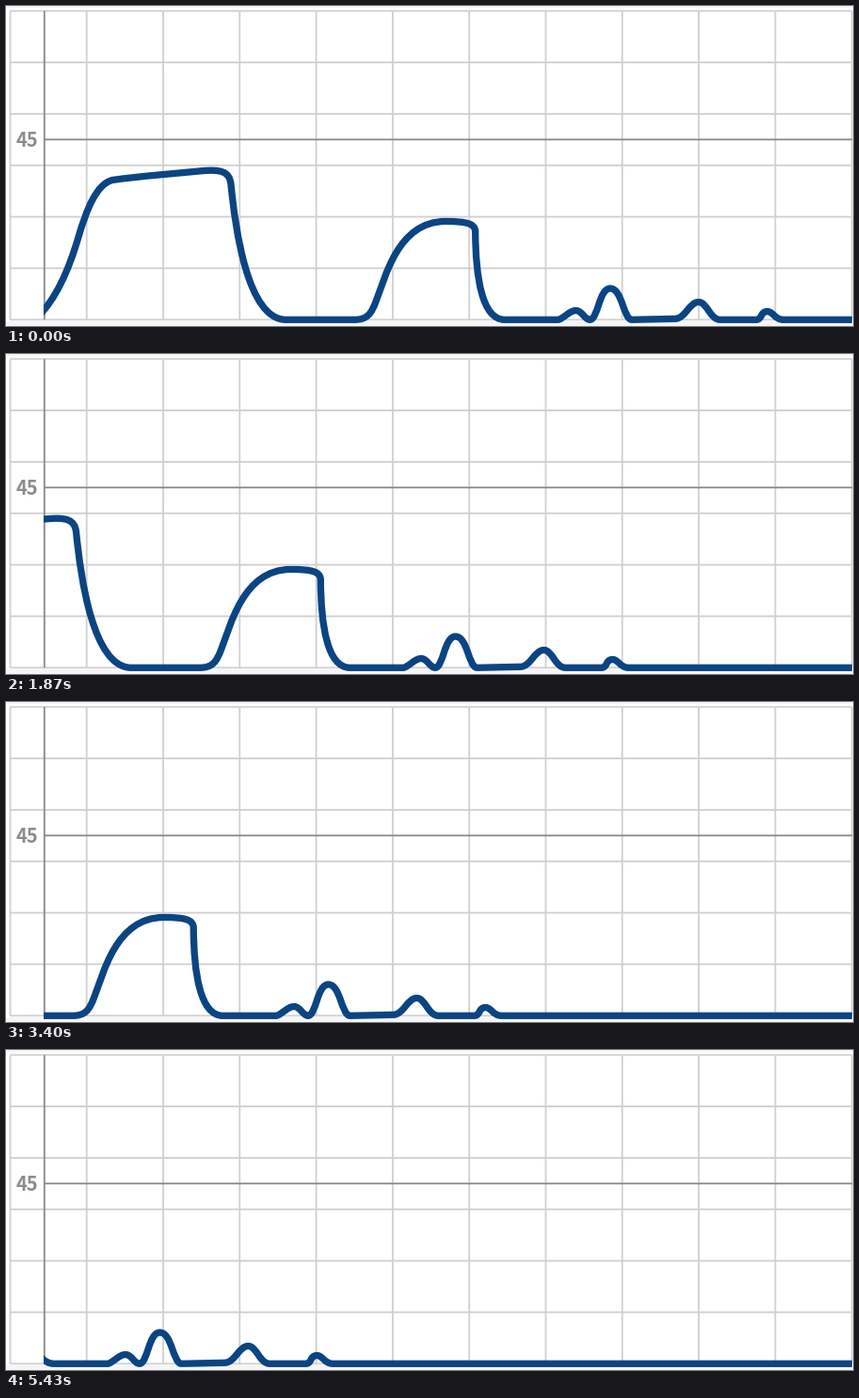
Recreate the animation shown at these times as a matplotlib script. Size 900 px wide and 341 px high, loop 6010 ms.

```python
import numpy as np
import matplotlib.pyplot as plt
from matplotlib.animation import FuncAnimation
from matplotlib.collections import LineCollection
from matplotlib.patches import PathPatch, Rectangle
from matplotlib.path import Path
from matplotlib.transforms import Affine2D

W, H, DPI = 900, 341, 100
TICK_MS, TICKS = 10, 601
STEPS, SPEED = 163, 2.936        # scroll steps per loop, pixels per step
LEFT, TOP, RIGHT, BASE = 4.5, 5.3, 898.7, 334.3
AXIS_X, LIMIT_Y = 40.8, 142.3
BLUE, GRID, DARK, LABEL = "#0b4483", "#d0d0d0", "#8b888a", "#8c8c8c"


def px(width):
    return width * 72 / DPI


def build_curve():
    """Two tall plateaus followed by four small bumps, in stage pixels."""
    verts, codes = [(34, 331)], [Path.MOVETO]

    def curve(*points):
        verts.extend(points)
        codes.extend([Path.CURVE4] * len(points))

    def line(x, y=BASE):
        verts.append((x, y))
        codes.append(Path.LINETO)

    # first plateau
    curve((52, 313), (66, 284), (77, 246))
    curve((86, 216), (96, 190), (113, 185.5))
    curve((145, 181), (175, 179), (208, 175.7))
    curve((228, 174), (237.5, 176), (239, 190))
    curve((244, 240), (257, BASE - 1), (297, BASE))
    line(370)
    # second plateau
    curve((384, BASE), (388, 328), (393, 315))
    curve((403, 290), (416, 229.5), (467, 229.5))
    curve((490, 229.5), (498, 232), (498.7, 240))
    curve((499, 290), (506, BASE), (530, BASE))
    line(587)
    # bumps
    curve((593, 332.5), (599, 324.5), (605.5, 324.5))
    curve((612, 324.5), (615, BASE), (620.5, BASE))
    curve((629, BASE), (630, 301), (642, 301))
    curve((655, 301), (656, BASE), (665, BASE))
    line(711, 333.3)
    curve((722, 333), (726, 315.5), (736, 315.5))
    curve((745, 315.5), (748, BASE), (759, BASE))
    line(797)
    curve((804, BASE), (801, 325.5), (809, 325.5))
    curve((815, 325.5), (817, BASE), (826, BASE))
    line(1450)
    return Path(verts, codes)


fig = plt.figure(figsize=(W / DPI, H / DPI), dpi=DPI, facecolor="white")
ax = fig.add_axes([0, 0, 1, 1])
ax.set_xlim(0, W)
ax.set_ylim(H, 0)
ax.axis("off")


def add_lines(segments, color, width):
    lines = LineCollection(segments, colors=color, linewidths=px(width))
    lines.set_snap(False)
    ax.add_collection(lines)


# faint strips above and below the chart
for y, height in ((0, 2), (336, 5)):
    ax.add_patch(Rectangle((0, y), W, height, color="#f5f5f5", lw=0))

columns = [LEFT, *np.linspace(85.7, RIGHT, 11)]
rows = np.linspace(TOP, BASE, 7)
add_lines([[(x, TOP), (x, BASE)] for x in columns]
          + [[(LEFT, y), (RIGHT, y)] for y in rows], GRID, 1.8)
add_lines([[(AXIS_X, TOP), (AXIS_X, BASE)],
           [(AXIS_X, LIMIT_Y), (RIGHT + 0.5, LIMIT_Y)]], DARK, 1.8)

ax.text(33.8, LIMIT_Y - 0.3, "45", color=LABEL, family="Noto Sans CJK JP",
        weight="bold", size=px(20), ha="right", va="center_baseline")

trace = PathPatch(build_curve(), fill=False, edgecolor=BLUE, lw=px(7.3),
                  capstyle="round", joinstyle="round", zorder=5)
ax.add_patch(trace)
window = Rectangle((40, 0), RIGHT + 0.5 - 40, H, transform=ax.transData)
trace.set_clip_path(window)


def draw(tick):
    # steps come 30 times a second, then the last pose holds
    step = min(STEPS, int((tick + 0.5) * 0.3))
    trace.set_transform(Affine2D().translate(-SPEED * step, 0) + ax.transData)
    return [trace]


anim = FuncAnimation(fig, draw, frames=TICKS, interval=TICK_MS,
                     repeat=True, repeat_delay=0, blit=False)
plt.show()
```
